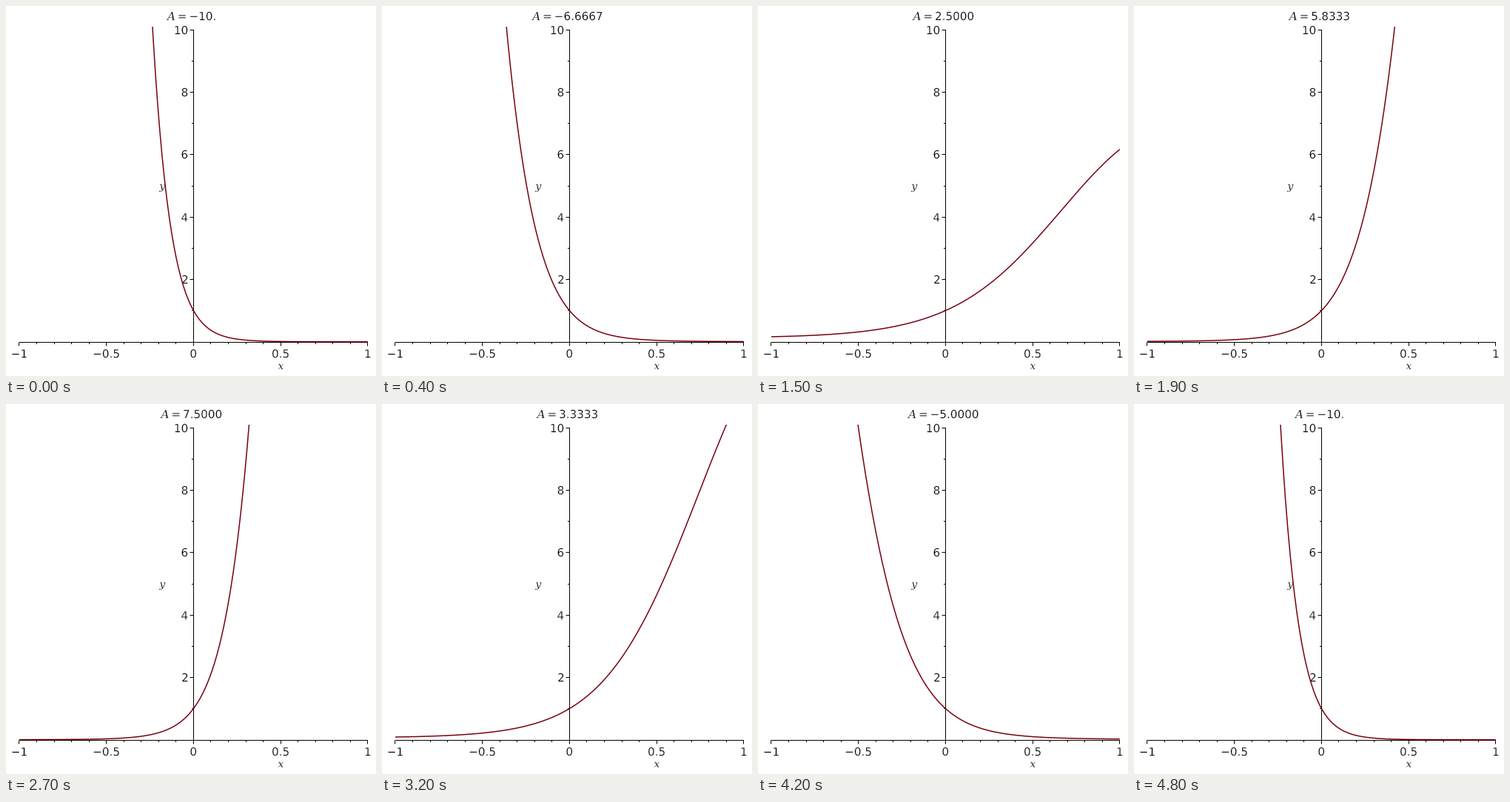
Recreate the animation shown at these times as a matplotlib script. Size 500 by 500 pixels, loop 4900 ms.

```python
import numpy as np
import matplotlib.pyplot as plt
from matplotlib.animation import FuncAnimation
from matplotlib.patches import Rectangle
from matplotlib.patheffects import Stroke

SIZE, DPI = 500, 72
LEFT, RIGHT, TOP = 18, 489, 28
X0, Y0 = 253.4, 453.8
UNIT_X, UNIT_Y = 235.5, 42.2
STEPS = 24

plt.rcParams.update({
    "mathtext.fontset": "custom",
    "mathtext.rm": "DejaVu Sans",
    "mathtext.it": "DejaVu Serif:italic",
})

fig = plt.figure(figsize=(SIZE / DPI, SIZE / DPI), dpi=DPI, facecolor="white")
ax = fig.add_axes([0, 0, 1, 1])
ax.set(xlim=(0, SIZE), ylim=(SIZE, 0))
ax.axis("off")


def label(x, y, tex, ha="center", size=15.2):
    # a hairline white outline slims the glyphs
    return ax.text(x, y, f"${tex}$", ha=ha, va="baseline", size=size, color="black",
                   path_effects=[Stroke(linewidth=0.25, foreground="white")])


def rule(xs, ys):
    ax.plot(xs, ys, color="black", lw=1, solid_capstyle="butt", snap=False, zorder=2)


def draw_axes():
    base, mid = 454.5, 253.5
    rule([LEFT, RIGHT], [base, base])
    rule([mid, mid], [32, 455])
    for k in range(-10, 11):
        x = np.floor(X0 + k / 10 * UNIT_X) + 0.5
        rule([x, x], [base, base + (5 if k % 5 == 0 else 2.5)])
        if k % 5 == 0:
            label(X0 + k / 10 * UNIT_X + 0.3, 475.3, f"{k / 10:g}")
    for k in range(11):
        y = np.floor(Y0 + 0.3 - k * UNIT_Y) + 0.5
        major = k % 2 == 0 and k > 0
        rule([mid - (5 if major else 2.5), mid], [y, y])
        if major:
            label(247.2, y + 5.7, str(k), ha="right")
    label(372.3, 491, "x", size=14)
    label(212.6, 248, "y", size=14)


draw_axes()
title = label(252, 19.2, "A")
curve, = ax.plot([], [], color="#78000e", lw=1.5, solid_capstyle="butt", zorder=4)
curve.set_clip_path(Rectangle((LEFT, TOP), RIGHT - LEFT, 430,
                              transform=ax.transData))

xs = np.linspace(-1, 1, 301)
growth = xs / 2 + np.sin(2 * xs) / 4    # integral of cos(x)^2


def number(a):
    return f"{a:.0f}." if a in (-10, 0, 10) else f"{a:#.5g}"


def update(i):
    k = STEPS - abs(STEPS - i)
    a = -10 + 20 * k / STEPS
    y = np.minimum(np.exp(a * growth), 40)
    curve.set_data(X0 + xs * UNIT_X, Y0 - y * UNIT_Y)
    title.set_text(f"$A = {{{number(a)}}}$")
    return curve, title


anim = FuncAnimation(fig, update, frames=2 * STEPS + 1, interval=100,
                     repeat=True, repeat_delay=0, blit=False)
plt.show()
```
